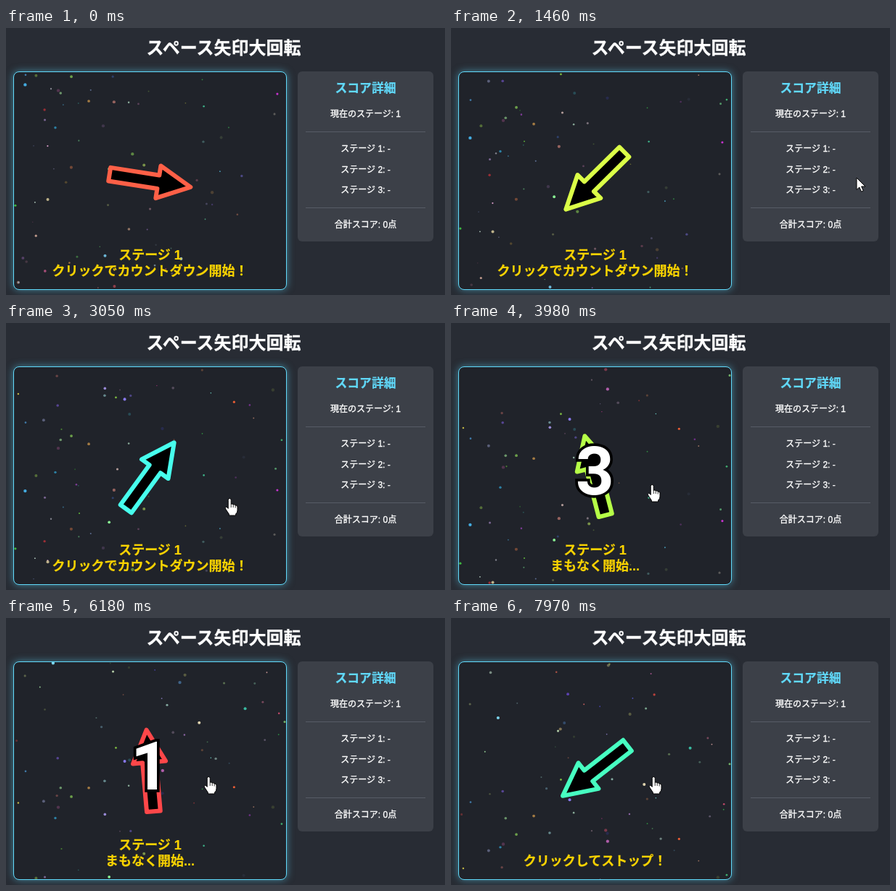
An HTML page with a canvas for the animation above (8000 ms loop, 605 by 369 pixels).

```html
<!DOCTYPE html>
<html lang="ja">
<head>
<meta charset="utf-8">
<title>スペース矢印大回転</title>
<style>
  html, body { margin: 0; width: 100%; height: 100%; overflow: hidden; background: #282c34; }
  body {
    position: relative; color: #fff;
    font: 12px/20px "Liberation Sans", "Noto Sans CJK JP", "Noto Sans CJK", sans-serif;
  }
  body > *, .panel > * { position: absolute; margin: 0; box-sizing: border-box; white-space: nowrap; }
  h1 {
    left: 0; top: 13px; width: 600px; font-size: 24px; line-height: 30px; text-align: center;
    -webkit-text-stroke: .3px;
  }
  .game {
    left: 10px; top: 60px; width: 377px; height: 302px; overflow: hidden;
    border: 1px solid #61dafb; border-radius: 8px; background: #20232a;
    box-shadow: 0 0 11px rgba(97, 218, 251, .5);
  }
  canvas { display: block; }
  .message {
    left: 11px; bottom: 22px; width: 375px; text-align: center; white-space: pre-line;
    font-size: 18px; font-weight: bold; line-height: 22px; color: #fad300;
    -webkit-text-stroke: .2px;
  }
  .panel {
    left: 402px; top: 60px; width: 187px; height: 235px;
    border-radius: 6px; background: #3c4048; text-align: center;
  }
  .panel > * { left: 0; width: 100%; }
  .panel > p { -webkit-text-stroke: .35px; }
  h2 { top: 14px; font-size: 16.8px; line-height: 20px; color: #61dafb; -webkit-text-stroke: .2px; }
  hr { border: 0; height: 1px; background: #575c66; }
  .panel > hr { left: 11px; width: 165px; }
  .cursor { left: 0; top: 0; width: 24px; height: 28px; overflow: visible; }
</style>
</head>
<body>
<h1>スペース矢印大回転</h1>
<div class="game"><canvas width="375" height="300"></canvas></div>
<div class="message"></div>
<div class="panel">
  <h2>スコア詳細</h2>
  <p style="top:49px">現在のステージ: 1</p>
  <hr style="top:83px">
  <p style="top:97px">ステージ 1: -</p>
  <p style="top:126px">ステージ 2: -</p>
  <p style="top:154px">ステージ 3: -</p>
  <hr style="top:188px">
  <p style="top:202px">合計スコア: 0点</p>
</div>
<svg class="cursor" fill="#fff" stroke="#000" stroke-linejoin="round">
  <path id="pointer" d="M0 0V16.5L3.8 13L6.5 19.2L9.3 18L6.6 12H12Z"/>
  <g id="hand">
    <path d="M-1.8 1.5Q-1.8 -.5 .2 -.5T2.2 1.5V7.2Q4.6 6.3 5.2 8Q7.6 7.2 8.2 9Q11 8.6 11 11V16Q11 19 8.6 21V23H-.6V21.2L-5 14.6Q-6.6 12 -4.6 11.4Q-3.2 11.2 -1.8 13.4Z"/>
    <path d="M2.2 7V12M5.2 8V12M8.2 9V12.5" fill="none" stroke-width=".8"/>
  </g>
</svg>
<script>
const LOOP = 8000, STEP = 66.43, STEP_LEAD = 11;
const W = 375, H = 300, STARS = 72;
const SPIN = 332.8, HUE_RATE = 290;
const COUNT_START = 3600;

const ctx = document.querySelector('canvas').getContext('2d');
const message = document.querySelector('.message');
const cursor = document.querySelector('.cursor');
const pointer = document.getElementById('pointer');
const hand = document.getElementById('hand');

// time, x, y of the cursor's hot spot
const cursorPath = [
  [1260, 602, 222], [1460, 560, 207], [1600, 482, 214], [1720, 419, 226],
  [1860, 370, 236], [2150, 322, 242], [2450, 308, 243], [3100, 308, 243],
  [3450, 282, 226], [3650, 277, 224], [4400, 277, 224], [4800, 279, 221], [5400, 279, 220]
];

const arrowShape = [
  [-56.5, -9.4], [11.5, -9.4], [11.5, -22.6], [56.5, 0],
  [11.5, 22.6], [11.5, 9.4], [-56.5, 9.4]
];

function random(...keys) {
  const s = Math.sin(keys.reduce((sum, k, i) => sum + k * (12.9898 + i * 65.243), 4.1)) * 43758.5453;
  return s - Math.floor(s);
}

function drawStars(seconds) {
  for (let i = 0; i < STARS; i++) {
    const travel = random(i, 1) * H + (20 + 50 * random(i, 2)) * seconds;
    const lap = Math.floor(travel / H);
    const channel = k => Math.floor(50 + 206 * random(i, lap, k));
    ctx.globalAlpha = .25 + .75 * random(i, lap, 6);
    ctx.fillStyle = `rgb(${channel(3)},${channel(4)},${channel(5)})`;
    ctx.beginPath();
    ctx.arc(random(i, lap, 7) * W, travel % H, .6 + 1.6 * random(i, 8), 0, Math.PI * 2);
    ctx.fill();
  }
  ctx.globalAlpha = 1;
}

function drawArrow(seconds) {
  ctx.save();
  ctx.translate(W / 2, H / 2);
  ctx.rotate((9 + SPIN * seconds) * Math.PI / 180);
  ctx.beginPath();
  arrowShape.forEach(([x, y]) => ctx.lineTo(x, y));
  ctx.closePath();
  ctx.fillStyle = '#000';
  ctx.strokeStyle = `hsl(${(8 + HUE_RATE * seconds) % 360}, 100%, 64%)`;
  ctx.lineWidth = 6;
  ctx.lineJoin = 'round';
  ctx.fill();
  ctx.stroke();
  ctx.restore();
}

function drawCount(digit) {
  ctx.font = 'bold 92px Roboto, sans-serif';
  ctx.textAlign = 'center';
  ctx.lineJoin = 'miter';
  ctx.lineWidth = 7.5;
  ctx.strokeStyle = '#000';
  ctx.fillStyle = '#fff';
  ctx.strokeText(digit, W / 2, 176);
  ctx.fillText(digit, W / 2, 176);
}

function placeCursor(time) {
  const next = cursorPath.findIndex(([t]) => t > time);
  cursor.style.visibility = next === 0 ? 'hidden' : 'visible';
  if (next === 0) return;
  const a = cursorPath.at(next < 0 ? -1 : next - 1);
  const b = next < 0 ? a : cursorPath[next];
  const p = a === b ? 0 : (time - a[0]) / (b[0] - a[0]);
  const [x, y] = [1, 2].map(i => Math.round(a[i] + (b[i] - a[i]) * p));
  cursor.style.transform = `translate(${x}px, ${y}px)`;
  const overGame = x < 387;
  hand.style.display = overGame ? '' : 'none';
  pointer.style.display = overGame ? 'none' : '';
}

function render(now) {
  const step = Math.floor((now % LOOP + STEP_LEAD) / STEP);
  const time = step * STEP;
  const seconds = time / 1000;
  const count = 3 - Math.floor((time - COUNT_START) / 1000);

  ctx.clearRect(0, 0, W, H);
  drawStars(seconds);
  drawArrow(seconds);
  if (count > 0 && count < 4) drawCount(count);

  message.textContent =
    count > 3 ? 'ステージ 1\nクリックでカウントダウン開始！' :
    count > 0 ? 'ステージ 1\nまもなく開始...' : 'クリックしてストップ！';
  placeCursor(time);
}

const start = performance.now();
function tick() {
  render(performance.now() - start);
  requestAnimationFrame(tick);
}
tick();
</script>
</body>
</html>
```
